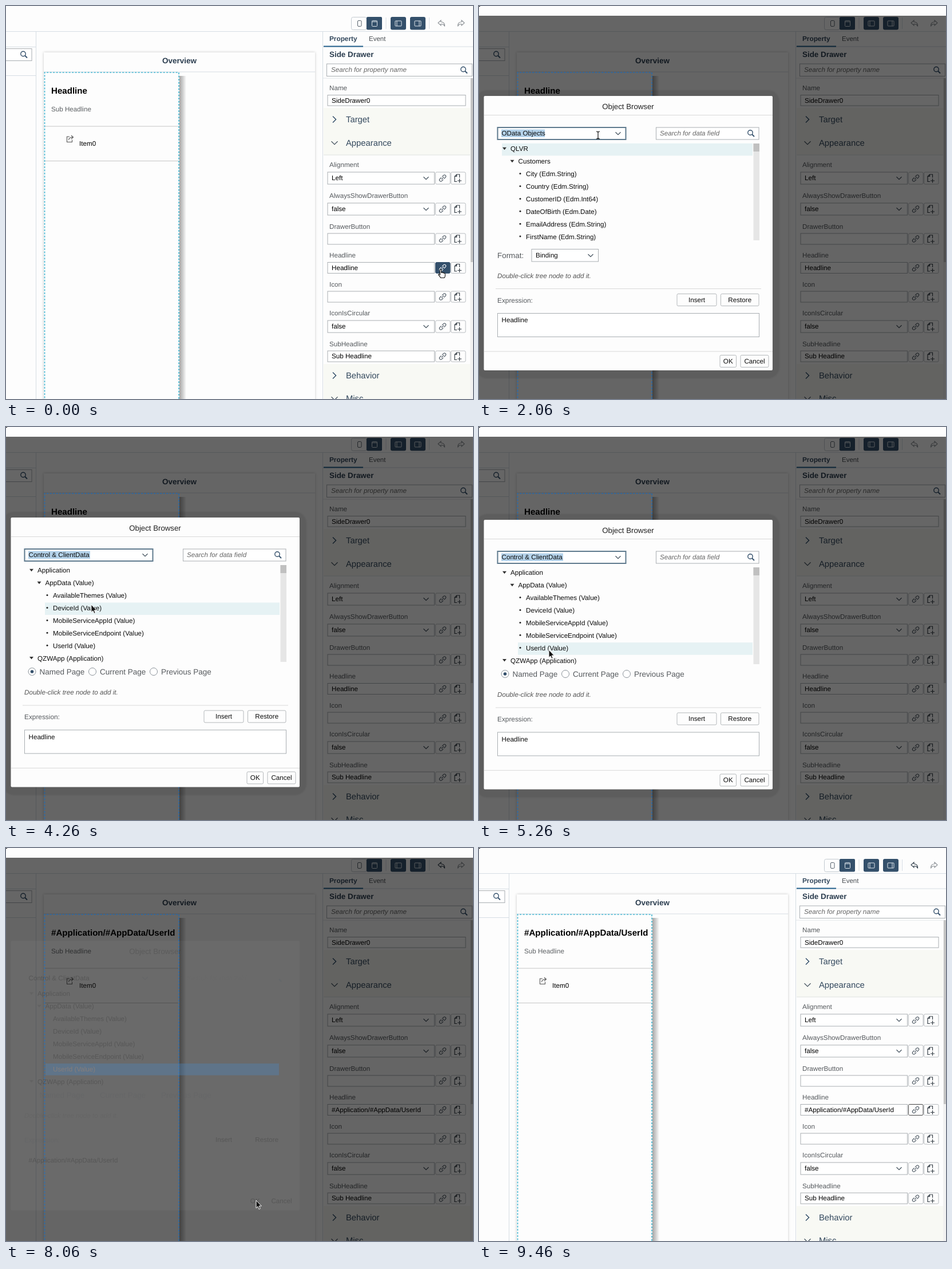
An HTML page for the animation above (9760 ms loop, 816 by 686 pixels).

```html
<!DOCTYPE html>
<html lang="en">
<head>
<meta charset="utf-8">
<title>Binding a property</title>
<style>
html, body { margin: 0; width: 100%; height: 100%; overflow: hidden; background: #fdfdfd; }
svg { display: block; width: 816px; height: 686px; }
text { font-family: "Liberation Sans", Arial, sans-serif; white-space: pre; text-rendering: geometricPrecision; }
#dlg.ghost text { opacity: .2; }
#dlg.ghost rect, #dlg.ghost line, #dlg.ghost circle { opacity: 0; }
#dlg.ghost path { opacity: .12; }
#dlg.ghost #box { opacity: .035; }
#dlg.ghost #pick { opacity: .35; fill: #4a86c4; stroke: none; }
#dlg.ghost #pickText { fill: #d09060; opacity: .35; }
</style>
</head>
<body>
<svg id="stage" viewBox="0 0 816 686" xmlns="http://www.w3.org/2000/svg"></svg>
<script>
const LOOP = 9760;
const INK = '#0c0c0c', LABEL = '#565a5e', NAVY = '#34506b', EDGE = '#a9aeb2', LINE = '#d6dde4', FOCUS = '#5f7a8e';

// Drawing helpers: each returns SVG markup.
const text = (x, y, s, o = {}) => {
  const { size = 11.65, fill = INK, bold, italic, anchor = 'start', id = '' } = o;
  return `<text id="${id}" x="${x}" y="${y + size * .36}" font-size="${size}" fill="${fill}" text-anchor="${anchor}"` +
    `${bold ? ' font-weight="700"' : ''}${italic ? ' font-style="italic"' : ''}>${s.replace('&', '&amp;')}</text>`;
};
const rect = (x, y, x2, y2, fill, stroke = 'none', extra = '') =>
  `<rect x="${x}" y="${y}" width="${x2 - x}" height="${y2 - y}" fill="${fill}" stroke="${stroke}" ${extra}/>`;
const line = (x, y, x2, y2, c = LINE) => `<line x1="${x}" y1="${y}" x2="${x2}" y2="${y2}" stroke="${c}"/>`;
const path = (d, c = NAVY, w = 1.2, fill = 'none', extra = '') =>
  `<path d="${d}" stroke="${c}" stroke-width="${w}" fill="${fill}" ${extra}/>`;
const group = (id, body, extra = '') => `<g id="${id}" ${extra}>${body}</g>`;
const at = (x, y, body) => `<g transform="translate(${x} ${y})">${body}</g>`;

const chevron = (x, y, r = 4.5) => path(`M${x - r} ${y - r / 2}l${r} ${r}l${r} ${-r}`, '#44525e');
const lens = (x, y) => `<circle cx="${x - 1}" cy="${y - 1.5}" r="4.2" fill="none" stroke="${NAVY}" stroke-width="1.4"/>` +
  path(`M${x + 2} ${y + 1.5}l4 4`, NAVY, 1.8);
const chain = (x, y, id = '') => `<g id="${id}" transform="translate(${x} ${y}) rotate(-45)" fill="none" stroke="#46525d" stroke-width="1.1">` +
  '<path d="M-1 -2.4H-4.5a2.4 2.4 0 0 0 0 4.8H-1M1 -2.4H4.5a2.4 2.4 0 0 1 0 4.8H1M-3 0H3"/></g>';
const docPlus = (x, y) => path(`M${x + 3} ${y - 1}v-5.5h-5l-3.500 3.500v9h4M${x - 2} ${y - 6.500}v3.500h-3.500M${x + 3} ${y + 1}v7M${x - .5} ${y + 4.500}h7`, '#333c44', 1.2);
const button = (x, x2, y, y2, s) =>
  rect(x, y, x2, y2, '#fdfdfd', '#b4b8bb', 'rx="2"') + text((x + x2) / 2, (y + y2) / 2 - .3, s, { anchor: 'middle' });

function toolbar() {
  const frame = (x, w, h) => rect(x - w / 2, 30.5 - h / 2, x + w / 2, 30.5 + h / 2, 'none', '#dfe6ec', 'rx="1"');
  const undo = 'M-1 -6l-5 4.500l5 4.500v-2.500c4 -.3 5.500 1 6.500 4c.5 -5 -2 -7.500 -6.500 -7.800z';
  return rect(603.5, 19.5, 630, 41.5, '#fdfdfd', '#c3cad0', 'rx="3"') +
    rect(630, 19, 657, 41.5, NAVY, 'none', 'rx="2"') +
    rect(614.5, 25.5, 621, 35.5, 'none', '#55606a', 'rx="1.500"') + frame(644, 9, 10) +
    line(639.5, 27.5, 648.5, 27.5, '#dfe6ec') +
    line(664, 20, 664, 40) + line(739.5, 20, 739.5, 40) +
    rect(672, 19, 699, 41.5, NAVY, 'none', 'rx="3"') + frame(685.5, 11, 9) + line(683, 26, 683, 35, '#dfe6ec') +
    rect(706, 19, 733, 41.5, NAVY, 'none', 'rx="3"') + frame(719.5, 11, 9) + line(722, 26, 722, 35, '#dfe6ec') +
    at(761, 31, `<path id="undo" d="${undo}" fill="none" stroke="#8c9196" stroke-width="1.1"/>`) +
    at(795, 31, `<path transform="scale(-1 1)" d="${undo}" fill="none" stroke="#8c9196" stroke-width="1.1"/>`) +
    line(0, 44.5, 816, 44.5);
}

function canvas() {
  return line(52.5, 44, 52.5, 686) + line(0, 71.5, 52, 71.5) + line(0, 121.5, 52, 121.5) +
    rect(-10, 74.5, 45, 95.5, '#fff', EDGE) + lens(31, 85) +
    rect(66, 81, 540, 720, '#fdfdfd', 'none', 'style="filter:drop-shadow(0 0 2px rgba(0,0,0,.22))"') +
    text(303, 95, 'Overview', { size: 13.5, bold: 1, fill: '#2c3e50', anchor: 'middle' }) +
    line(66, 115, 540, 115) +
    rect(303, 122, 315, 686, 'url(#fall)') + rect(67, 116, 302, 690, '#fdfdfd') +
    text(79, 148, 'Headline', { size: 15.1, bold: 1, fill: '#000', id: 'head' }) +
    text(79, 180, 'Sub Headline', { fill: '#5d6164' }) +
    line(68, 210, 301, 210, '#c6c6c6') + line(68, 270.5, 301, 270.5, '#c6c6c6') +
    path('M111 228h-4.500v9.500h9v-4M109.500 234c.3 -3.500 2.500 -5 7.500 -5M114 226l3.500 3l-3.500 3', '#555', 1.1) +
    text(128, 240, 'Item0', { fill: '#000' });
}

const FIELDS = [
  ['Alignment', 277, 300.5, 'Left', 1], ['AlwaysShowDrawerButton', 331, 354.5, 'false', 1],
  ['DrawerButton', 384.5, 406.5, ''], ['Headline', 435, 457, 'Headline'], ['Icon', 485.5, 507.5, ''],
  ['IconIsCircular', 536, 559.5, 'false', 1], ['SubHeadline', 590, 611.5, 'Sub Headline']
];

function field([label, ly, y, value, select]) {
  const h = select ? 10.5 : 9.5, hot = label === 'Headline';
  return text(565, ly, label, { fill: LABEL }) +
    rect(562, y - h, 748.5, y + h, '#fff', EDGE) +
    text(569, y - (select ? .8 : .3), value, { fill: '#000', id: hot ? 'value' : '' }) +
    (select ? chevron(734, y) : '') +
    rect(750.5, y - h, 776, y + h, '#fdfdfd', '#b8bcc0', `rx="2" id="${hot ? 'bind' : ''}"`) +
    rect(777.5, y - h, 803, y + h, '#fdfdfd', '#b8bcc0', 'rx="2"') +
    chain(763, y, hot ? 'bindIcon' : '') + docPlus(789.5, y);
}

function panel() {
  const section = (y, s, open) => (open ? chevron(574, y, 5.5) : path(`M571 ${y - 5.5}l5.500 5.500l-5.500 5.500`, NAVY, 1.5)) +
    text(594, y, s, { size: 14.8, fill: '#34495e' });
  return line(553.5, 44, 553.5, 686) + line(554, 71, 816, 71) +
    text(565, 57, 'Property', { size: 11.8, bold: 1, fill: '#34495e' }) + text(634, 57, 'Event', { fill: '#4a4f54', size: 11.5 }) +
    rect(555, 69.5, 624, 71.5, '#24618c') +
    text(565, 84.5, 'Side Drawer', { size: 13.4, bold: 1, fill: '#2c3e50' }) +
    rect(560.5, 101, 814.5, 122.5, '#fff', EDGE) + text(568, 111, 'Search for property name', { italic: 1, fill: '#666' }) + lens(800, 112) +
    line(554, 126, 816, 126, '#e2e6ea') +
    rect(811, 126, 816, 686, '#f1f1f1') + rect(812, 126, 816, 447, '#c4c4c4') +
    text(565, 143, 'Name', { fill: LABEL }) + rect(562, 155.5, 803, 174, '#fff', EDGE) + text(569, 164.5, 'SideDrawer0', { fill: '#000' }) +
    rect(555, 178, 811, 260, '#f8f9f4') + line(555, 260, 811, 260, '#dfe3e0') +
    rect(555, 625, 811, 686, '#f8f9f4') +
    section(198, 'Target') + section(239, 'Appearance', 1) + section(645, 'Behavior') + section(685, 'Misc', 1) +
    FIELDS.map(field).join('');
}

// Dialog parts use the dialog's top edge as y = 0.
const rowY = i => 92.3 + 21.9 * i;
const tree = rows => rows.map(([depth, s], i) => {
  const y = rowY(i), x = 44.5 + 13.5 * depth;
  const mark = depth < 2 ? path(`M${x - 3.5} ${y - 2.5}h7l-3.500 4.500z`, 'none', 0, '#333') : `<circle cx="72" cy="${y - .5}" r="1.5" fill="#222"/>`;
  return mark + text(55 + 13.5 * depth, y, s, { id: s.startsWith('UserId') ? 'pickText' : '' });
}).join('');

const TREE_A = [[0, 'QLVR'], [1, 'Customers'], ...['City (Edm.String)', 'Country (Edm.String)', 'CustomerID (Edm.Int64)',
  'DateOfBirth (Edm.Date)', 'EmailAddress (Edm.String)', 'FirstName (Edm.String)'].map(s => [2, s])];
const TREE_B = [[0, 'Application'], [1, 'AppData (Value)'], ...['AvailableThemes', 'DeviceId', 'MobileServiceAppId',
  'MobileServiceEndpoint', 'UserId'].map(s => [2, s + ' (Value)']), [0, 'QZWApp (Application)']];

function dialog() {
  const radio = (x, s, on) => `<circle cx="${x}" cy="269" r="6.5" fill="#fff" stroke="#8a9299"/>` +
    (on ? `<circle cx="${x}" cy="269" r="2.8" fill="${NAVY}"/>` : '') + text(x + 13, 269, s, { size: 13.5, fill: LABEL });
  const lower = text(32, 313.5, 'Double-click tree node to add it.', { italic: 1, fill: '#555' }) +
    line(29, 336.5, 493, 336.5, '#d9d9d9') + text(32, 356.5, 'Expression:', { size: 11.85, fill: LABEL }) +
    button(346, 415, 345.5, 366.5, 'Insert') + button(422.5, 489, 345.5, 366.5, 'Restore') +
    rect(32.5, 379.5, 489.5, 420.5, '#fff', EDGE, 'id="area"') + text(39.5, 391, 'Headline', { id: 'expr' }) +
    rect(196, 385, 197, 397, '#000', 'none', 'id="caret"') +
    line(9, 446, 513, 446, '#d9d9d9') + button(421, 449.5, 452.5, 473.5, 'OK') + button(457, 506, 452.5, 473.5, 'Cancel');
  return rect(-6, -10, 525, 493, 'rgba(0,0,0,.08)', 'none', 'id="shade" rx="20" style="filter:blur(1px)"') +
    rect(8.5, 0, 513, 479, '#fdfdfd', 'none', 'id="box" rx="2"') +
    text(260.5, 18, 'Object Browser', { size: 13.25, fill: '#222', anchor: 'middle' }) + line(9, 33.5, 513, 33.5, '#d9d9d9') +
    rect(32.5, 55, 256.5, 76, '#fff', EDGE, 'id="combo"') + rect(39, 58.5, 115, 72, '#b4d2ea', 'none', 'id="mark"') +
    text(39.5, 65, 'OData Objects', { id: 'kind' }) + chevron(243, 65.5) +
    rect(309.5, 55, 489, 76, '#fff', EDGE) + text(316, 65, 'Search for data field', { italic: 1, fill: '#666' }) + lens(475, 65.5) +
    rect(40, 0, 478, 21.5, '#e6f2f4', 'none', 'id="hover"') +
    rect(69, rowY(6) - 9.5, 477, rowY(6) + 11, '#21907f', '#3558b8', 'id="pick" stroke-width="2"') +
    group('treeA', tree(TREE_A)) + group('treeB', tree(TREE_B)) +
    rect(479.5, 83, 490, 252, '#e6e6e6') + rect(479.5, 83, 490, 97, '#c0c0c0') +
    group('format', text(32, 278.5, 'Format:', { size: 13.4, fill: LABEL }) + rect(92, 267.5, 208.5, 289, '#fff', EDGE) +
      text(99, 278, 'Binding') + chevron(195, 278.5)) +
    group('radios', radio(45.5, 'Named Page', 1) + radio(151, 'Current Page') + radio(258, 'Previous Page')) +
    group('lower', lower) +
    group('menu', rect(32.5, 78, 256.5, 132, '#fff', '#cfd3d6', 'style="filter:drop-shadow(0 2px 4px rgba(0,0,0,.25))"') +
      rect(33, 79, 256, 105, '#e6f2f4', 'none', 'id="menuHover"') +
      text(39.5, 92, 'OData Objects') + text(39.5, 118, 'Control & ClientData'));
}

const cursors =
  group('arrow', path('M0 -5v13.500l3 -2.800l2 4.800l2.200 -1l-2 -4.600h4.200z', '#fff', 1, '#111')) +
  group('ibeam', path('M-3 -6q3 0 3 2v9q0 2 -3 2M3 -6q-3 0 -3 2v9q0 2 3 2', '#111', 1.2)) +
  group('hand', path('M-3 -6.500q1.500 -1.500 2.500 0v5q1.800 -1.200 2.500 .3q1.800 -.7 2.300 .7q2 -.4 2 1.500v3q0 2 -1.500 3.500h-6.300q-2 -3.500 -4 -5.500q0 -2 3 0z', '#111', 1.1, '#fff'));

const stage = document.getElementById('stage');
stage.innerHTML = '<defs><linearGradient id="fall"><stop stop-color="#a6a6a6"/><stop offset=".5" stop-color="#cfcfcf"/>' +
  '<stop offset="1" stop-color="#fdfdfd"/></linearGradient></defs>' +
  rect(0, 0, 816, 686, '#fdfdfd') + toolbar() + canvas() + panel() +
  rect(0, 17, 816, 686, '#000', 'none', 'id="dim"') +
  path('M67.500 690V116H302V690', '#4db9d3', 1.7, 'none', 'id="dash" stroke-dasharray="3.300 2.200"') +
  rect(0, 0, 2, 1, '#000', 'none', 'id="speck"') + group('dlg', dialog()) + group('pointer', cursors);

const el = Object.fromEntries([...stage.querySelectorAll('[id]')].filter(n => n.id).map(n => [n.id, n]));
const show = (id, on) => { el[id].style.display = on ? '' : 'none'; };
const set = (id, attrs) => { for (const k in attrs) el[id].setAttribute(k, attrs[k]); };

// Pointer stops: time, x, y.
const MOVES = [[0, 761, 467], [1060, 761, 467], [1860, 208, 225], [2460, 208, 225], [3060, 150, 276], [3660, 150, 276],
  [4060, 149, 315], [4460, 149, 315], [5060, 122, 394], [6060, 122, 394], [6860, 452, 619], [7060, 452, 619], [7460, 437, 620], [LOOP, 437, 620]];

function pointerAt(t) {
  const i = MOVES.findIndex((m, k) => k && t <= m[0]);
  const [t0, x0, y0] = MOVES[i - 1], [t1, x1, y1] = MOVES[i];
  const p = (t - t0) / (t1 - t0), e = p * p * (3 - 2 * p);
  return [x0 + (x1 - x0) * e, y0 + (y1 - y0) * e];
}

const PATH = '#Application/#AppData/UserId';

function draw(t) {
  const isB = t >= 3660, picked = t >= 5460, typed = t >= 5660, done = t >= 8060;
  const dimmed = t >= 460 && t < 8260;
  const top = !isB ? 157 : t < 4460 ? 158 : 162;
  const [x, y] = pointerAt(t);

  show('speck', t >= 30);
  set('dim', { opacity: !dimmed ? 0 : t < 660 ? .35 : .6 });
  set('dash', { stroke: dimmed ? '#2b6aa6' : '#4db9d3' });
  el.head.textContent = el.value.textContent = done ? PATH : 'Headline';
  set('undo', { stroke: done ? '#33404c' : '#8c9196' });
  const pressed = t < 460, focused = t >= 8260;
  set('bind', { fill: pressed ? NAVY : '#fdfdfd', stroke: pressed ? NAVY : focused ? '#444' : '#b8bcc0' });
  set('bindIcon', { stroke: pressed ? '#fff' : '#46525d' });

  show('dlg', dimmed);
  set('dlg', { transform: `translate(0 ${top})`, opacity: t < 660 ? .5 : 1, class: done ? 'ghost' : '' });
  set('box', { height: isB ? 470.5 : 479 });
  set('shade', { height: isB ? 494.5 : 503 });
  set('lower', { transform: `translate(0 ${isB ? -8.6 : 0})` });
  show('treeA', !isB); show('format', !isB);
  show('treeB', isB); show('radios', isB);
  el.kind.textContent = isB ? 'Control & ClientData' : 'OData Objects';
  show('mark', !picked);
  set('mark', { width: isB ? 108 : 76 });
  set('combo', { stroke: picked ? EDGE : FOCUS, 'stroke-width': picked ? 1 : 2 });
  show('menu', t >= 2460 && t < 3660);
  set('menuHover', { y: top + 105 > y ? 79 : 105 });

  // The tree highlights the row below the pointer; the first list keeps its root lit.
  const row = isB ? Math.round((y - top - 92.3) / 21.9) : 0;
  const left = row > 1 ? 68 : 40;
  show('hover', isB ? row >= 0 && row < 8 && !(picked && row === 6) : t >= 1860);
  set('hover', { x: left, width: 478 - left, y: rowY(row) - 9.5 });
  show('pick', picked);
  set('pickText', { fill: picked ? '#fff' : INK });
  el.expr.textContent = typed ? PATH : 'Headline';
  show('caret', typed && !done);
  set('area', { stroke: typed ? FOCUS : EDGE, 'stroke-width': typed ? 2 : 1 });

  const shape = t < 660 ? 'hand' : t >= 1660 && t < 2460 ? 'ibeam' : 'arrow';
  for (const c of ['hand', 'ibeam', 'arrow']) show(c, c === shape);
  show('pointer', t < 8660);
  set('pointer', { transform: `translate(${x} ${y})` });
}

// The picture advances five times a second, after two short opening steps.
const snap = t => t < 30 ? 0 : t < 60 ? 30 : Math.min(9460, 60 + Math.floor((t - 60) / 200) * 200);
const start = performance.now();
let last = -1;
function tick(now) {
  const t = snap(Math.max(0, now - start) % LOOP);
  if (t !== last) draw(last = t);
  requestAnimationFrame(tick);
}
draw(0);
requestAnimationFrame(tick);
</script>
</body>
</html>
```
